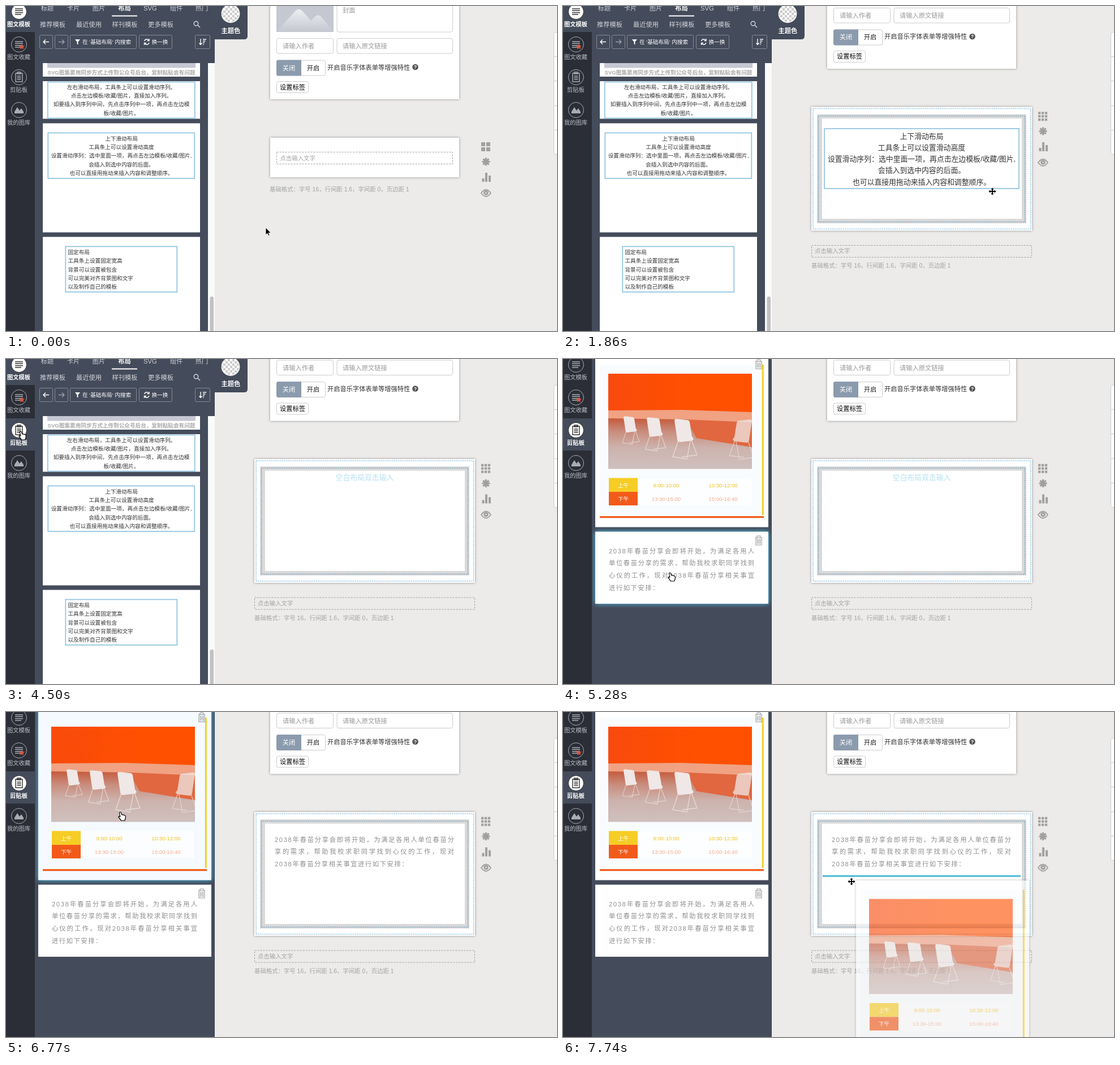
Animation, 974 px wide and 575 px high, one loop 8 s. Source, as an HTML page:

```html
<!DOCTYPE html>
<html lang="zh-CN">
<head>
<meta charset="utf-8">
<title>布局编辑器</title>
<style>
html, body { margin: 0; width: 100%; height: 100%; overflow: hidden; background: #ecebea; }
svg.stage { display: block; width: 100%; height: 100%; }
text, p { font-family: "Liberation Sans", "Noto Sans CJK SC", "Noto Sans CJK", sans-serif; }
text { font-size: 11.26px; dominant-baseline: central; }
.mid { text-anchor: middle; }
.s { font-size: 9.65px; fill: #333; }
.m { font-size: 10.4px; fill: #a3a3a3; }
.l { font-size: 12.87px; fill: #333; }
.small text { font-size: 9.65px; }
.b { font-weight: 700; }
.hint { fill: #999; }
.paper { fill: #fff; }
.shade { filter: drop-shadow(0 0 2px rgba(0,0,0,.4)); }
.field { fill: #fff; stroke: #ccc; }
.frame { fill: none; stroke: #8fc4e0; stroke-width: 1.7; }
.dots { fill: none; stroke: #7dbbe0; stroke-width: 1.6; stroke-dasharray: 1.6 1.7; }
.dash { fill: none; stroke: #999; stroke-width: .9; stroke-dasharray: 3 2; }
.btn { fill: none; stroke: #858b97; }
.line { fill: none; stroke: currentColor; stroke-width: 1.4; }
p { margin: 0; color: #8e8e8e; font-size: 11.26px; letter-spacing: 1.6px; line-height: 21.7px; text-align: justify; }

/* every animation shares one 8 s clock; hard changes use step-end */
.stage { --glow: drop-shadow(0 0 4px #4fc4ee); }
.cut { animation: 8s step-end infinite; }
.move { animation: 8s linear infinite; }
.off { visibility: hidden; }

.page { animation-name: scroll; }
@keyframes scroll {
  0%, 10% { transform: none; } 11%, 17.75% { transform: translateY(-2.5px); }
  18.875% { transform: translateY(-15px); } 23.25% { transform: translateY(-54px); }
  25.5%, 100% { transform: translateY(-55.5px); }
}
.before { animation-name: before; } @keyframes before { 10% { visibility: hidden; } }
.after { animation-name: after; } @keyframes after { 10% { visibility: visible; } }
.story { animation-name: story; } @keyframes story { 10% { visibility: visible; } 41% { visibility: hidden; } }
.blank { animation-name: blank; } @keyframes blank { 41% { visibility: visible; } 78% { visibility: hidden; } }
.placed { animation-name: placed; } @keyframes placed { 78% { visibility: visible; } }
.templates { animation-name: templates; } @keyframes templates { 60.6% { visibility: hidden; } }
.clips { animation-name: clips; } @keyframes clips { 60.6% { visibility: visible; } }
.mark { animation-name: mark; } @keyframes mark { 95.6% { visibility: visible; } }

.glow-side { animation-name: glow-side; } @keyframes glow-side { 49.7% { filter: var(--glow); } 52.9% { filter: none; } }
.glow-vert { animation-name: glow-vert; } @keyframes glow-vert { 2.25% { filter: var(--glow); } 17.5% { filter: none; } }
.glow-note { animation-name: glow-note; } @keyframes glow-note { 66% { filter: var(--glow); } 78% { filter: none; } }
.glow-plan { animation-name: glow-plan; } @keyframes glow-plan { 83.5% { filter: var(--glow); fill: #f5faff; } 91% { filter: none; fill: #fff; } }

.item { --row: transparent; --disc: transparent; --ink: #a9acb3; --label: #b9bcc2; --w: 400; }
.item .row { fill: var(--row); }
.item circle { fill: var(--disc); stroke: var(--ink); }
.item text { fill: var(--label); font-weight: var(--w); font-size: 10.3px; text-anchor: middle; }
.item .line { color: var(--ink); }
.item.first { --row: #444b5a; --disc: #fff; --ink: #333; --label: #fff; --w: 700; animation-name: item-off; }
.item.third { animation-name: item-on; }
@keyframes item-off { 60.6% { --row: transparent; --disc: transparent; --ink: #a9acb3; --label: #b9bcc2; --w: 400; } }
@keyframes item-on { 55.1% { --row: #444b5a; --disc: #fff; --ink: #333; --label: #fff; --w: 700; } }

.ghost { opacity: .62; }
.drag-note { animation-name: drag-note, show-note; animation-timing-function: linear, step-end; }
.drag-plan { animation-name: drag-plan, show-plan; animation-timing-function: linear, step-end; }
@keyframes drag-note {
  0%, 70.375% { transform: none; } 74.625% { transform: translate(310px, 54.5px); }
  77%, 100% { transform: translate(336px, 60px); }
}
@keyframes show-note { 70.375% { visibility: visible; } 78% { visibility: hidden; } }
@keyframes drag-plan { 0%, 89% { transform: none; } 96.75%, 100% { transform: translate(461px, 304.5px); } }
@keyframes show-plan { 89% { visibility: visible; } }

.pointer { animation-name: pointer; }
@keyframes pointer {
  0%, 1.125% { transform: translate(459px, 392px); }
  4.375%, 15.6% { transform: translate(290px, 344px); }
  18.875% { transform: translate(620px, 350px); }
  23.25%, 30% { transform: translate(759px, 328px); }
  38.75%, 41% { transform: translate(905px, 150px); }
  50.75%, 51.75% { transform: translate(250px, 180px); }
  55.1%, 61.5% { transform: translate(27px, 128px); }
  66%, 70.375% { transform: translate(190px, 378px); }
  74.625% { transform: translate(472px, 319px); }
  77%, 81.375% { transform: translate(500px, 345px); }
  84.6%, 89% { transform: translate(203px, 177px); }
  96.75%, 100% { transform: translate(510px, 300px); }
}
.arrow { animation-name: arrow; }
@keyframes arrow {
  2.25% { visibility: hidden; } 17.5% { visibility: visible; } 19% { visibility: hidden; }
  34% { visibility: visible; } 38.75% { visibility: hidden; } 44% { visibility: visible; } 49.7% { visibility: hidden; }
}
.hand { animation-name: hand; }
@keyframes hand {
  2.25% { visibility: visible; } 17.5% { visibility: hidden; } 38.75% { visibility: visible; } 44% { visibility: hidden; }
  49.7% { visibility: visible; } 70.375% { visibility: hidden; } 83.5% { visibility: visible; } 89% { visibility: hidden; }
}
.cross { animation-name: cross; }
@keyframes cross {
  19% { visibility: visible; } 34% { visibility: hidden; }
  70.375% { visibility: visible; } 83.5% { visibility: hidden; } 89% { visibility: visible; }
}
</style>
</head>
<body>
<svg class="stage" viewBox="0 0 974 575">
<defs>
  <linearGradient id="hill" x2="0" y2="1"><stop stop-color="#eceef1"/><stop offset="1" stop-color="#c5c8d1"/></linearGradient>
  <linearGradient id="wall"><stop stop-color="#f84a0c"/><stop offset=".6" stop-color="#ff5000"/></linearGradient>
  <linearGradient id="floor" x2="0" y2="1">
    <stop stop-color="#c4502f"/><stop offset=".3" stop-color="#c98d7d"/><stop offset=".6" stop-color="#cdb3ad"/><stop offset="1" stop-color="#cfc0bd"/>
  </linearGradient>
  <pattern id="check" width="8" height="8" patternUnits="userSpaceOnUse"><path fill="#fff" d="M0 0h8v8H0z"/><path fill="#ccc" d="M0 0h4v4H0zM4 4h4v4H4z"/></pattern>
  <g id="chair">
    <path d="M7 37L-3 66L22 70L28 38M30 36L40 63L14 66" fill="none" stroke="#e6dcd9" stroke-width="1.3"/>
    <path d="M0 2Q0-1 4-1L22 1Q26 1 27 5L31 30L34 34Q33 38 27 38L10 40Q5 40 5 35Z" fill="#efe8e6"/>
  </g>
  <g id="bin" fill="none" stroke="#999" stroke-width="1.1"><path d="M-6-5H6M-3-5V-8H3V-5M-5-5V8H5V-5M-2.5-3V6M0-3V6M2.5-3V6"/></g>
  <path id="sheet" d="M-7-5H7M-7-1.7H7M-7 1.7H7M-7 5H4"/>
</defs>

<rect width="974" height="575" fill="#ecebea"/>
<g class="field">
  <rect x="968.5" y="46.5" width="20" height="216" rx="3"/>
  <path d="M969 89.5h6M969 132.5h6M969 176.5h6M969 219.5h6"/>
</g>

<g class="page move">
  <rect class="paper shade" x="467" y="-60" width="334" height="225"/>
  <path fill="#c5c8d1" d="M478-60h101V46H478z"/>
  <path fill="url(#hill)" d="M479 45L511 9Q518 2 525 10L539 26L547 18Q552 14 557 19L578 45Z"/>
  <rect class="field" x="585" y="-60" width="204.5" height="106" rx="3"/>
  <rect class="field" x="478.5" y="57.5" width="100" height="26.5" rx="3"/>
  <rect class="field" x="585" y="57.5" width="204.5" height="26.5" rx="3"/>
  <g class="hint"><text x="595" y="8">封面</text><text x="489" y="71">请输入作者</text><text x="595" y="71">请输入原文链接</text></g>
  <rect class="field" x="478.5" y="96" width="86" height="27" rx="3"/>
  <path d="M481 95.5H522V123.5H481Q478 123.5 478 120V99Q478 95.5 481 95.5Z" fill="#8b9bad"/>
  <g class="mid"><text x="500" y="109.5" fill="#fff">关闭</text><text x="543" y="109.5" fill="#222">开启</text></g>
  <text x="568" y="108.5" fill="#333">开启音乐字体表单等增强特性</text>
  <circle cx="723.5" cy="108" r="5.3" fill="#555"/><text class="mid b" x="723.5" y="108.3" fill="#fff" style="font-size:8.5px">?</text>
  <rect class="field" x="478.5" y="133.5" width="56" height="20" rx="3"/><text class="mid" x="506.5" y="143.5">设置标签</text>

  <g class="before cut">
    <rect class="paper shade" x="467" y="233" width="334" height="70"/>
    <rect class="dash" x="478.5" y="258.5" width="311" height="21"/>
    <text class="m" x="484.5" y="269">点击输入文字</text>
    <text class="m" x="466" y="324">基础格式：字号 16，行间距 1.6，字间距 0，页边距 1</text>
    <path fill="#a0a0a0" d="M840 241h7v7h-7zM849 241h7v7h-7zM840 250h7v7h-7zM849 250h7v7h-7z"/>
  </g>
  <g class="after cut off">
    <rect class="paper shade" x="439" y="232.5" width="390" height="219"/>
    <rect class="dots" x="442" y="235.5" width="384.5" height="213"/>
    <rect x="449" y="245.5" width="370" height="193" fill="#d9d9d9"/>
    <rect class="dots" x="451.5" y="248.5" width="365" height="187.5" style="stroke:#6d9cbb"/>
    <rect class="paper" x="458" y="253" width="353" height="177.5"/>
    <rect class="dash" x="439.5" y="477.5" width="389" height="21"/>
    <text class="m" x="445" y="487.7">点击输入文字</text>
    <text class="m" x="439" y="514">基础格式：字号 16，行间距 1.6，字间距 0，页边距 1</text>
    <path stroke="#a0a0a0" stroke-width="4.3" stroke-dasharray="4.3 1.6" d="M840 243.3h16.5M840 249.2h16.5M840 255.1h16.5"/>
  </g>
  <g class="story cut off">
    <rect class="frame" x="462" y="271" width="344" height="106"/>
    <text class="l mid" x="634" y="284" data-step="20.15">上下滑动布局|工具条上可以设置滑动高度|设置滑动序列：选中里面一项，再点击左边模板/收藏/图片,|会插入到选中内容的后面。|也可以直接用拖动来插入内容和调整顺序。</text>
  </g>
  <text class="l mid blank cut off" x="634" y="264.5" style="fill:#b5e0ef">空白布局双击输入</text>
  <foreignObject class="placed cut off" x="475" y="270.7" width="318.5" height="80"><p>2038年春苗分享会即将开始，为满足各用人单位春苗分享的需求，帮助我校求职同学找到心仪的工作，现对2038年春苗分享相关事宜进行如下安排：</p></foreignObject>
  <path class="mark cut off" d="M459 345.8H809" stroke="#49b9d6" stroke-width="3"/>

  <g fill="none" stroke="#a0a0a0">
    <path stroke-width="3.2" d="M848.5 268.5v14M841.5 275.5h14M843.5 270.5l10 10M853.5 270.5l-10 10"/>
    <path stroke-width="4" d="M843.5 311v-6M849 311v-16M855 311v-11"/>
    <path stroke-width="1.8" d="M840 331Q848.5 319 857 331Q848.5 343 840 331Z"/>
    <circle cx="848.5" cy="330.5" r="2.8" stroke-width="3"/>
  </g>
</g>

<rect x="51" width="318" height="575" fill="#444b5a"/>

<g class="templates cut">
  <path fill="#444b5a" d="M369 0H427V53Q427 59 421 59H369Z"/>
  <circle cx="397" cy="13.5" r="15.8" fill="url(#check)" stroke="#fff" stroke-width="1.2"/>
  <text class="mid b" x="397.5" y="43.5" fill="#fff">主题色</text>
  <g class="mid" fill="#d0d3d9">
    <text x="73" y="4">标题</text><text x="119" y="4">卡片</text><text x="164" y="4">图片</text><text class="b" x="209.5" y="4" fill="#fff">布局</text>
    <text x="255" y="4">SVG</text><text x="301" y="4">组件</text><text x="346" y="4">热门</text>
    <text x="82.5" y="33">推荐模板</text><text x="146.5" y="33">最近使用</text><text x="210" y="33">样刊模板</text><text x="273.5" y="33">更多模板</text>
  </g>
  <path d="M187 17.5H232" stroke="#fff" stroke-width="2"/>
  <g class="line" color="#d5d8dd"><circle cx="336" cy="31" r="3.8"/><path d="M339 34l4 4"/></g>
  <g class="btn">
    <rect x="59.5" y="51.5" width="23" height="24" rx="2"/><rect x="86.5" y="51.5" width="23" height="24" rx="2"/>
    <rect x="113.5" y="51.5" width="117" height="24" rx="2"/><rect x="235.5" y="51.5" width="58" height="24" rx="2"/><rect x="334.5" y="51.5" width="26" height="24" rx="2"/>
  </g>
  <path class="line" color="#fff" d="M76 63.5H66.5M70 59.5l-4 4l4 4"/>
  <path class="line" color="#9ba0aa" d="M93 63.5h9.5M99 59.5l4 4l-4 4"/>
  <path fill="#fff" d="M122 59h9l-3.5 4.5v5l-2-1.5v-3.5z"/>
  <g class="small" fill="#fff"><text x="135" y="63.5">在 '基础布局' 内搜索</text><text x="257.5" y="63.5">换一换</text></g>
  <path class="line" color="#fff" d="M244.5 62Q246 58.5 249 58.8Q251 59 252.5 61M253 58v3.5h-3.5M253 65Q251.5 68.5 248.5 68.2Q246.5 68 245 66M244.5 69v-3.5h3.5"/>
  <path class="line" color="#fff" d="M344 58v10M341.5 65.5l2.5 3l2.5-3M348 59h6M348 62h4.5M348 65h3M348 68h1.5"/>

  <path fill="#fafafa" d="M357 101h12v474h-12z"/><rect x="360.5" y="514" width="6.5" height="80" rx="3.2" fill="#c1c1c4"/>
  <path class="paper" d="M65 101h278v24H65z"/><path fill="#c5c8d2" d="M73 101h262v8.5H73z"/>
  <text class="s b mid" x="204" y="117" style="fill:#aaa">SVG图集要用同步方式上传到公众号后台，复制粘贴会有问题</text>

  <rect class="paper glow-side cut" x="65" y="133" width="278" height="66.5"/>
  <rect class="frame" x="73.8" y="134.5" width="260" height="64"/>
  <text class="s mid" x="204" y="142.5" data-step="15.4">左右滑动布局，工具条上可以设置滑动序列。|点击左边模板/收藏/图片，直接加入序列。|如要插入到序列中间，先点击序列中一项，再点击左边模|板/收藏/图片。</text>

  <rect class="paper glow-vert cut" x="65" y="207.5" width="278" height="193"/>
  <rect class="frame" x="74.3" y="224.5" width="259" height="80.5"/>
  <text class="s mid" x="204" y="233.5" data-step="15.4">上下滑动布局|工具条上可以设置滑动高度|设置滑动序列：选中里面一项，再点击左边模板/收藏/图片,|会插入到选中内容的后面。|也可以直接用拖动来插入内容和调整顺序。</text>

  <rect class="paper" x="65" y="408.5" width="278" height="170"/>
  <rect class="frame" x="105.3" y="425.5" width="197" height="80.5"/>
  <text class="s" x="109.5" y="434.7" data-step="15.4">固定布局|工具条上设置固定宽高|背景可以设置被包含|可以完美对齐背景图和文字|以及制作自己的模板</text>
</g>

<g class="clips cut off">
  <rect class="paper glow-plan cut" x="57" y="-6.5" width="306" height="304"/>
  <g id="plan">
    <path fill="#f4f9ff" fill-opacity=".5" d="M65 10h290v268H65z"/>
    <svg x="80" y="26" width="254" height="168.5" viewBox="80 26 254 168.5">
      <path fill="url(#wall)" d="M80 26h254v76H80z"/>
      <path fill="url(#floor)" d="M80 100h254v95H80z"/>
      <path fill="#e0673f" d="M218 106L334 110V156L236 140Z"/>
      <path fill="#f0a283" d="M80 91L210 90L334 94V112L218 107L80 105Z"/>
      <use href="#chair" transform="translate(107 102) scale(.7)"/>
      <use href="#chair" transform="translate(148 104) scale(.84)"/>
      <use href="#chair" transform="translate(197 107)"/>
      <use href="#chair" transform="translate(334 108) scale(-1 1)" opacity=".75"/>
    </svg>
    <path class="paper" fill-opacity=".6" d="M81 210.5h252v48.5H81z"/>
    <path d="M353.3 10V276" stroke="#f6cf22" stroke-width="3"/>
    <path d="M65 279.7H355" stroke="#f25a19" stroke-width="3.2"/>
    <path fill="#f6cd25" d="M81 210.5h51v24.5H81z"/><path fill="#f25a19" d="M81 235h51v24H81z"/>
    <g class="mid small">
      <g fill="#fff"><text x="106.5" y="223">上午</text><text x="106.5" y="247">下午</text></g>
      <g fill="#efc11f"><text x="182.5" y="223">9:00-10:00</text><text x="283" y="223">10:30-12:00</text></g>
      <g fill="#f7ab8c"><text x="182.5" y="247">13:30-15:00</text><text x="283" y="247">15:00-16:40</text></g>
    </g>
  </g>
  <rect class="paper glow-note cut" x="57" y="305.5" width="306" height="127.5"/>
  <foreignObject id="note" x="81" y="329.7" width="258.5" height="95"><p>2038年春苗分享会即将开始，为满足各用人单位春苗分享的需求，帮助我校求职同学找到心仪的工作，现对2038年春苗分享相关事宜进行如下安排：</p></foreignObject>
  <use href="#bin" x="346" y="9.5"/><use href="#bin" x="346" y="321"/>
</g>

<rect width="51" height="575" fill="#2b2e37"/>
<g class="item first cut" transform="translate(23 10)">
  <rect class="row" x="-23" y="-21" width="51" height="57"/><circle r="13.5"/><use class="line" href="#sheet"/><text x="-.5" y="22.5">图文模板</text>
</g>
<g class="item" transform="translate(23 68)">
  <circle r="13.5"/><use class="line" href="#sheet"/><path fill="#d9553f" d="M5-1l1.5 3.2l3.5.4l-2.6 2.4l.7 3.5L5 6.800L1.900 8.500l.7-3.500L0 2.600l3.500-.4z"/><text x="-.5" y="22.5">图文收藏</text>
</g>
<g class="item third cut" transform="translate(23 126)">
  <rect class="row" x="-23" y="-21" width="51" height="57"/><circle r="13.5"/>
  <path class="line" d="M-6-7H6V8H-6ZM-3-9H3V-6H-3ZM-3.5-2H3.5M-3.5 1H3.5M-3.5 4H3.5"/><text x="-.5" y="22.5">剪贴板</text>
</g>
<g class="item" transform="translate(23 184)">
  <circle r="13.5"/><path fill="#a9acb3" d="M-8 6V3L-3-5L1 1L4-3L8 3V6Z"/><text x="-.5" y="22.5">我的图库</text>
</g>

<g class="ghost drag-note move off" data-copy="note"><rect class="paper shade" x="57" y="305.5" width="306" height="127.5"/></g>
<g class="ghost drag-plan move off" data-copy="plan"><rect class="paper shade" x="57" y="-6.5" width="306" height="304"/></g>

<g class="pointer move">
  <path class="arrow cut" d="M0 0V13L3 10.3L5 14.5L7 13.6L5.2 9.6H9.2Z" stroke="#fff" stroke-width=".8"/>
  <path class="hand cut off" d="M-2.5 1.5Q-2.5 0-1.2 0T.5 1.5L1.8 5Q3.5 4 4.3 5.3Q6 4.6 6.5 6Q8.3 5.8 8.3 8Q8.5 11.5 6.8 15H.3Q-.5 13-4 9Q-4.5 6.5-1.2 8.3Z" fill="#fff" stroke="#000" stroke-width="1.2" stroke-linejoin="round"/>
  <path class="cross cut off" d="M0-6.5L2.7-3.5H1V-1H3.5V-2.7L6.5 0L3.5 2.7V1H1V3.5H2.7L0 6.5L-2.7 3.5H-1V1H-3.5V2.7L-6.5 0L-3.5-2.7V-1H-1V-3.5H-2.7Z" stroke="#fff" stroke-width="1.6" paint-order="stroke"/>
</g>
</svg>
<script>
const all = selector => document.querySelectorAll(selector);

// "|" separates the lines of a text block
for (const text of all('[data-step]')) {
  const lines = text.textContent.split('|');
  text.textContent = '';
  lines.forEach((line, i) => {
    const span = document.createElementNS(text.namespaceURI, 'tspan');
    span.setAttribute('x', text.getAttribute('x'));
    span.setAttribute('y', +text.getAttribute('y') + i * text.dataset.step);
    span.textContent = line;
    text.append(span);
  });
}

for (const ghost of all('[data-copy]')) {
  const copy = document.getElementById(ghost.dataset.copy).cloneNode(true);
  copy.removeAttribute('id');
  ghost.append(copy);
}
</script>
</body>
</html>
```
